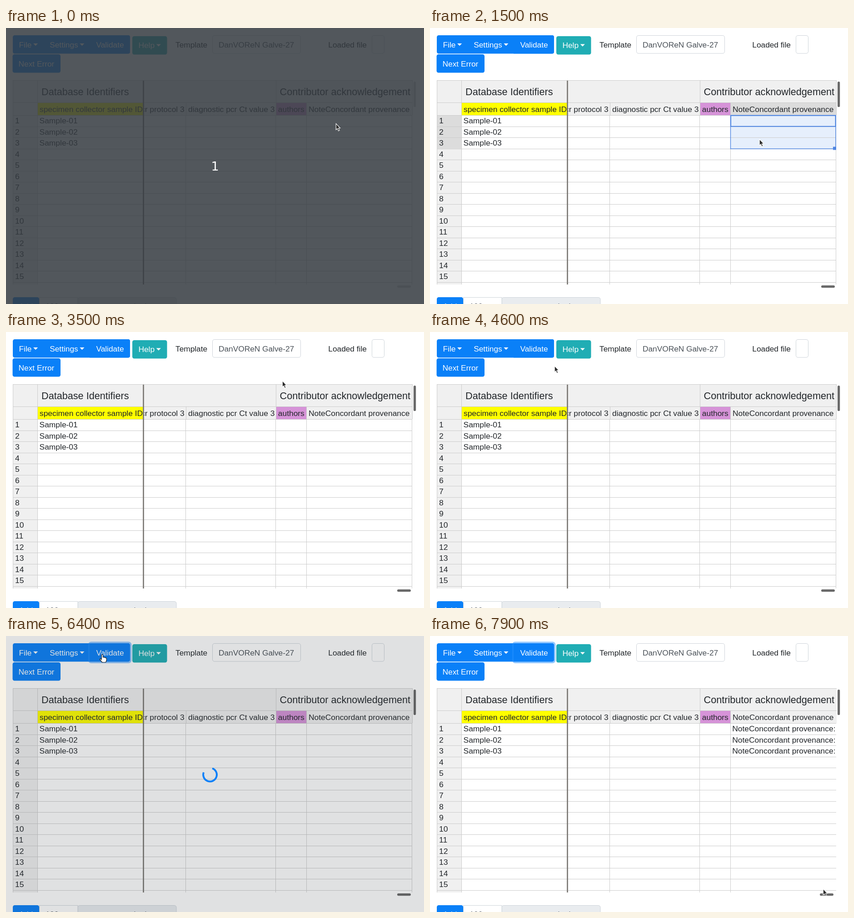
An HTML page that plays this animation: 920x608 px, repeating every 8000 ms.

```html
<!DOCTYPE html>
<html lang="en">
<head>
<meta charset="utf-8">
<title>Spreadsheet validation</title>
<style>
  html, body { margin: 0; width: 100%; height: 100%; overflow: hidden; background: #fff; }
  svg { display: block; }
  text { font: 17.4px "Liberation Sans", Arial, sans-serif; fill: #212529; white-space: pre; }
  .nav { font-size: 17.3px; }
  .light { fill: #fff; }
  .field { fill: #495057; }
  .group { font-size: 21.65px; }
  .count { font: 27px "DejaVu Sans", sans-serif; fill: #fff; }
  .line { stroke: #ccc; fill: none; }
</style>
</head>
<body>
<svg id="stage" width="920" height="608" viewBox="0 0 920 608"></svg>
<script>
const LOOP = 8000, STEP = 100;
const TOP = 192, ROW = 24.53, BOTTOM = 565;
const BLUE = '#0a80f8', DARK = '#0b66c8', HEAD = '#f0f0f0', HEAD_ON = '#dcdcdc', EDGE = '#ced4da';
const TOOL = 'NoteConcordant provenance';

const rect = (x, y, w, h, fill, more = '') =>
  `<rect x="${x}" y="${y}" width="${w}" height="${h}" fill="${fill}" ${more}/>`;
const text = (x, y, str, cls = '', more = '') =>
  `<text x="${x}" y="${y}" class="${cls}" ${more}>${str}</text>`;
const line = (d, more = '') => `<path class="line" d="${d}" ${more}/>`;
const caret = (x, y) => `<path d="M${x} ${y}h10.2l-5.1 5.2z" fill="#fff"/>`;
const rowY = i => TOP + ROW * i;
const range = n => [...Array(n).keys()];

function toolbar() {
  return rect(15, 16, 258, 40.5, BLUE, 'rx="4.3"') +
    `<path id="validate" d="M184 16h84.7q4.3 0 4.3 4.3v31.9q0 4.3-4.3 4.3h-84.7z"/>` +
    rect(182.5, 14.3, 92.2, 43.9, 'none', 'id="ring" rx="5" stroke="#268fff" stroke-opacity=".5" stroke-width="3.4"') +
    text(28.5, 42.5, 'File', 'nav light') + caret(60, 34) +
    text(96.2, 42.5, 'Settings', 'nav light') + caret(162.3, 34) +
    text(198.4, 42.5, 'Validate', 'nav light') +
    rect(278, 18, 76.5, 40.5, '#20adb4', 'rx="4.3"') +
    text(291.5, 44.3, 'Help', 'nav light') + caret(330.7, 35.5) +
    rect(14.5, 58, 105.5, 40.5, BLUE, 'rx="4.3"') +
    text(27.6, 84.5, 'Next Error', 'nav light') +
    text(373, 42.5, 'Template', 'nav') +
    rect(454.5, 16.5, 194, 39.5, '#fff', `rx="4.3" stroke="${EDGE}"`) +
    text(468, 42.5, 'DanVOReN Galve-27', 'nav field') +
    text(709.3, 42.5, 'Loaded file', 'nav') +
    rect(805.5, 16.5, 27, 39.5, '#fff', `rx="4.3" stroke="${EDGE}"`);
}

function table() {
  let s = rect(15, 116, 880, 76, HEAD) + rect(15, TOP, 54.5, BOTTOM - TOP, HEAD);
  s += rect(662, 165, 232, 27, HEAD_ON, 'id="colOn"');
  s += rect(16, TOP, 53.5, ROW, HEAD_ON, 'id="rowOn"');
  s += rect(70, 165, 231.5, 27, '#ff0') + rect(595, 165, 67, 27, '#d693d8');
  s += rect(662, TOP, 231, ROW, '#e6effc', 'id="tint"');

  const rules = range(16).map(i => `M15 ${Math.round(rowY(i)) + .5}H894`).join('');
  s += line(`M15 115.5H895M15 164.5H895M15.5 115V${BOTTOM}M69.5 115V${BOTTOM}` + rules +
    `M594.5 115V192M396.5 165V192M661.5 165V${BOTTOM}M395.5 192V${BOTTOM}M593.5 192V${BOTTOM}`);
  s += line(`M894.5 115V192M893.5 192V${BOTTOM}`, 'id="rightEdge"');

  s += text(78, 147.8, 'Database Identifiers', 'group') + text(602.5, 147.8, 'Contributor acknowledgement', 'group');
  s += text(74, 185, 'specimen collector sample ID');
  s += `<g clip-path="url(#scrolled)">${text(392.7, 185, 'diagnostic pcr protocol 3', '', 'text-anchor="end"')}</g>`;
  s += text(401, 185, 'diagnostic pcr Ct value 3') + text(598.8, 185, 'authors') + text(666, 185, TOOL);
  range(15).forEach(i => s += text(20, 210 + ROW * i, i + 1));
  range(3).forEach(i => s += text(73.6, 210 + ROW * i, 'Sample-0' + (i + 1)));
  s += `<g id="filled">${range(3).map(i => text(665.3, 210 + ROW * i, TOOL + ':')).join('')}</g>`;

  s += rect(301.2, 116, 2.6, BOTTOM - 116, '#787571');
  s += `<g id="pick" fill="none" stroke="#4f86e2">
    ${rect(662, 192.8, 230.6, 24, 'none', 'stroke-width="2"')}
    ${rect(661.5, 192.5, 231.5, ROW, 'none', 'id="area" stroke-width="1.4"')}
    ${rect(887, 0, 7, 7, '#4f86e2', 'id="grip" stroke="none"')}</g>`;
  return s + `<g id="bars">${rect(897, 118, 5.2, 56, 'inherit', 'rx="2.6"')}${rect(861, 567, 30, 5.2, 'inherit', 'id="hbar" rx="2.6"')}</g>`;
}

function footer() {
  return rect(158, 593.5, 217, 40, '#e9ecef', `rx="4.3" stroke="${EDGE}"`) +
    rect(73.5, 593.5, 84.5, 40, '#fff', `stroke="${EDGE}"`) +
    rect(15, 593, 58, 40.5, BLUE, 'rx="4.3"') +
    text(28.5, 618.5, 'Add', 'nav light') + text(87, 618.5, '100', 'nav field') +
    text(172, 618.5, 'more rows at the bottom.', 'nav field');
}

document.getElementById('stage').innerHTML =
  `<clipPath id="scrolled">${rect(303.5, 165, 100, 27, '#000')}</clipPath>` +
  rect(0, 0, 920, 608, '#fff') + toolbar() + table() + footer() +
  `<g id="loading">${rect(0, 0, 920, 608, '#343a40', 'opacity=".15"')}
    <path id="spinner" d="M10.5-10.5A14.9 14.9 0 1 0 10.5 10.5" fill="none" stroke="${BLUE}" stroke-width="4"/></g>
  <g id="countdown">${rect(0, 0, 920, 608, '#343a40', 'opacity=".85"')}${text(460, 314, '1', 'count', 'text-anchor="middle"')}</g>
  <path id="arrow" d="M.3.6V14.2L3.3 11.4 5.6 16.7 8 15.6 5.7 10.5H9.6Z" fill="#2a2a2a" stroke="#fff" stroke-width="1.1"/>
  <path id="hand" d="M-1.8 9V1.4Q-1.8-.4-.2-.4T1.4 1.4V6Q3.6 4.9 4.4 6.4 6.2 5.7 7 7.2 9.2 6.9 9.2 9V12.5L7.6 17H-.3L-5.3 11Q-6 8.9-4 9L-1.8 11Z"
    fill="#fff" stroke="#222" stroke-width="1.2" stroke-linejoin="round"/>`;

const el = {};
document.querySelectorAll('[id]').forEach(node => el[node.id] = node);
const set = (name, attrs) => { for (const k in attrs) el[name].setAttribute(k, attrs[k]); };
const show = (name, on) => set(name, { visibility: on ? 'visible' : 'hidden' });
const clamp = p => Math.min(1, Math.max(0, p));
const smooth = p => p * p * (3 - 2 * p);

// Pointer moves: start, end, target x, y, optional bend point.
const MOVES = [
  [500, 600, 724.5, 210],
  [1300, 1600, 725, 256.5],
  [1700, 1800, 726, 256.5],
  [2200, 3100, 608.5, 113, 722, 181],
  [3100, 3300, 608, 107],
  [3800, 4700, 262, 73],
  [4700, 5100, 204, 49],
  [5200, 5300, 212, 41],
  [6700, 7600, 853, 536],
  [7600, 7900, 865, 556.5]
];

function pointer(t) {
  let x = 726, y = 210;
  for (const [from, to, tx, ty, bx = (x + tx) / 2, by = (y + ty) / 2] of MOVES) {
    if (t <= from) break;
    const s = smooth(clamp((t - from) / (to - from))), r = 1 - s;
    x = r * r * x + 2 * r * s * bx + s * s * tx;
    y = r * r * y + 2 * r * s * by + s * s * ty;
  }
  return [x, y];
}

function draw(t) {
  const [x, y] = pointer(t);
  const overButton = x > 184 && x < 273 && y > 16 && y < 56.5;
  const overHeader = t > 2200 && t < 3300 && y > 116 && y < TOP;
  const hand = overHeader || overButton && !(t > 5800 && t < 6400);
  const at = `translate(${x} ${y})`;
  set('arrow', { transform: at });
  set('hand', { transform: at });
  show('arrow', !hand);
  show('hand', hand);

  set('validate', { fill: overButton && (t < 6000 || t >= 6600) ? DARK : BLUE });
  show('ring', t >= 5700);

  const picked = t >= 800 && t < 3500;
  const height = ROW * (t < 1400 ? 1 : t < 1500 ? 2 : 3);
  ['colOn', 'rowOn', 'tint', 'pick'].forEach(name => show(name, picked));
  show('tint', picked && t >= 1400);
  ['rowOn', 'tint', 'area'].forEach(name => set(name, { height }));
  set('grip', { y: TOP + height - 4 });

  const shade = 207 - 101 * clamp((t - 700) / 400);
  set('bars', { fill: `rgb(${shade},${shade},${shade})` });

  const done = t >= 6500;
  show('filled', done);
  show('rightEdge', !done);
  set('hbar', { x: done ? 858 : 861 });

  const fade = done ? 0 : .5 - Math.cos(Math.PI * clamp((t - 5850) / 200)) / 2;
  set('loading', { opacity: fade });
  set('spinner', { transform: `translate(${fade < 1 ? 459 : 449} 305.5) rotate(${(t - 5900) * 360 / 750 + 5})` });
  show('countdown', t < 200);
}

const start = performance.now();
function tick() {
  const t = (performance.now() - start) % LOOP;
  draw(Math.floor(t / STEP) * STEP);
  requestAnimationFrame(tick);
}
tick();
</script>
</body>
</html>
```
